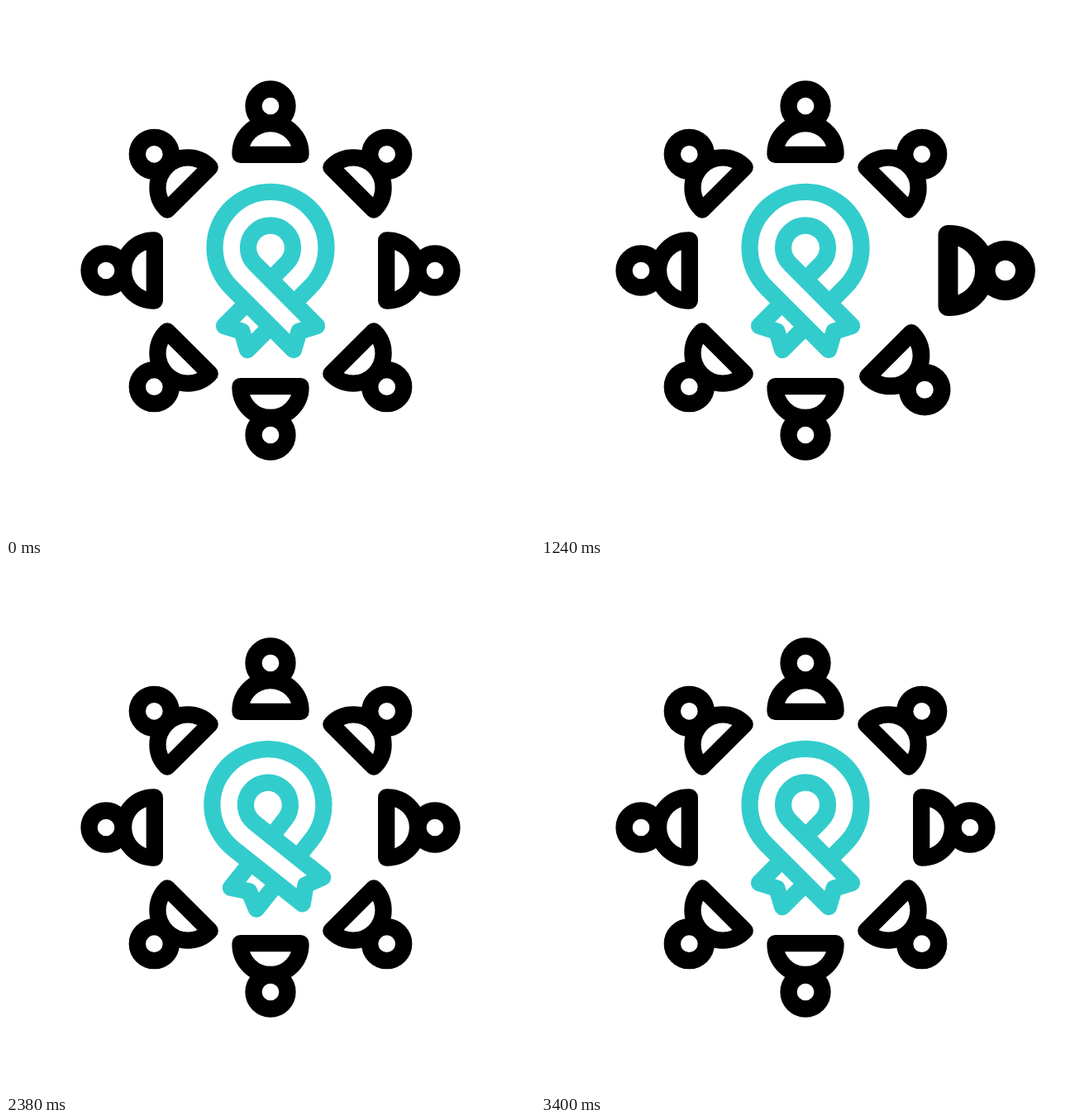
An HTML page with a canvas that plays this animation: 640 px wide and 640 px high, repeating every 3.6 s.

```html
<!DOCTYPE html>
<html lang="en">
<head>
<meta charset="utf-8">
<title>Ribbon circle</title>
<style>
  html, body { margin: 0; width: 100%; height: 100%; overflow: hidden; background: #fff; }
  canvas { display: block; width: 640px; height: 640px; }
</style>
</head>
<body>
<canvas id="stage" width="640" height="640"></canvas>
<script>
const ctx = document.getElementById('stage').getContext('2d');
const LOOP = 3600, STEP = 20, CENTER = 320;
const BLACK = '#000', TEAL = '#33cccc';
const DEG = Math.PI / 180;

const smooth = x => {
  x = Math.min(1, Math.max(0, x));
  return x * x * (3 - 2 * x);
};

// Rises from 0 to 1 and falls back, each over `half` ms.
const pulse = (t, start, half) => smooth(1 - Math.abs((t - start) / half - 1));

// People are drawn around their own middle, head up.
const person = new Path2D();
person.arc(0, -19, 20.5, 0, 2 * Math.PI);
person.closePath();
person.moveTo(-36.5, 39.8);
person.arc(0, 38.5, 36.5, Math.PI, 2 * Math.PI);
person.lineTo(36.5, 39.8);
person.closePath();

const ribbon = new Path2D(
  // front strand, its outer loop and right tail
  'M348.5 359.5 L367.7 340.2 A67.5 67.5 0 1 0 272.3 340.2' +
  ' L348 416 L354.5 393.8 L376 387 L300.9 311.6' +
  // inner loop
  ' A27 27 0 1 1 339.1 311.6 L320 331' +
  // left tail
  ' M291.5 359.5 L264 387 L285.5 393.8 L292 416 L320 388'
);

function drawPerson(index, t) {
  const p = pulse(t, 400 + index * 200, 200);
  const scale = 1 + 0.2 * p;
  ctx.save();
  ctx.translate(CENTER, CENTER);
  ctx.rotate((index - 1) * 45 * DEG);
  ctx.translate(0, -180 - 44 * p);
  ctx.scale(scale, scale);
  ctx.strokeStyle = BLACK;
  ctx.stroke(person);
  ctx.restore();
}

function drawRibbon(t) {
  const scale = 1 + 0.2 * pulse(t, 0, 200);
  const angle = 10 * (pulse(t, 2800, 300) - pulse(t, 2200, 300));
  ctx.save();
  ctx.translate(CENTER, CENTER);
  ctx.rotate(angle * DEG);
  ctx.scale(scale, scale);
  ctx.translate(-CENTER, -CENTER);
  ctx.strokeStyle = TEAL;
  ctx.stroke(ribbon);
  ctx.restore();
}

function render() {
  const t = Math.floor((performance.now() % LOOP) / STEP) * STEP;
  ctx.fillStyle = '#fff';
  ctx.fillRect(0, 0, 640, 640);
  ctx.lineWidth = 20.3;
  ctx.lineJoin = ctx.lineCap = 'round';
  drawRibbon(t);
  for (let i = 0; i < 8; i++) drawPerson(i, t);
  requestAnimationFrame(render);
}

render();
</script>
</body>
</html>
```
